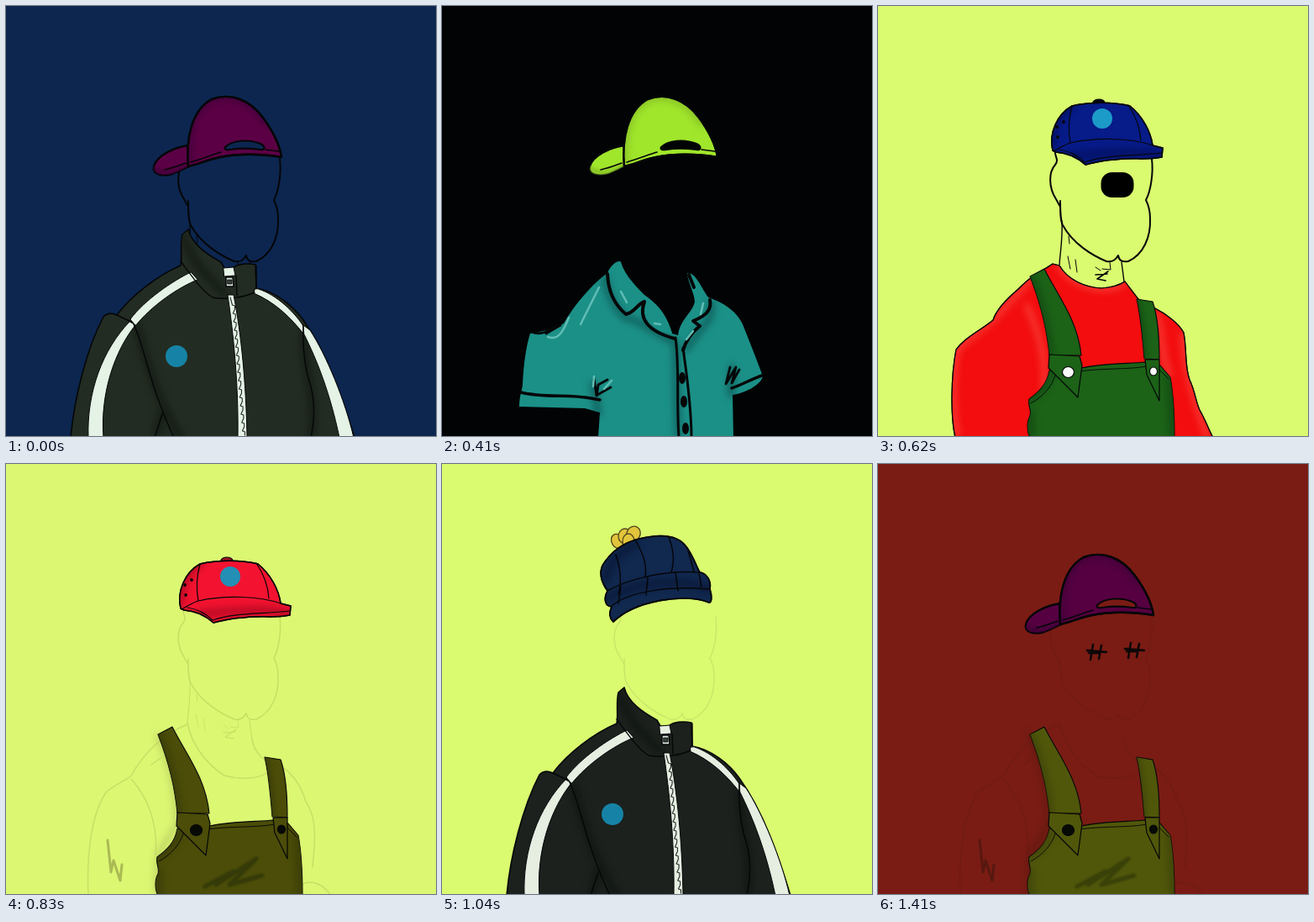
An HTML page with a canvas for the animation above (1.43 s loop, 512x512 px).

```html
<!DOCTYPE html>
<html lang="en">
<head>
<meta charset="utf-8">
<title>Character wardrobe</title>
<style>
html, body { margin: 0; width: 100%; height: 100%; overflow: hidden; background: #0c2650; }
canvas { display: block; width: 100vw; height: 100vh; }
</style>
</head>
<body>
<canvas id="stage" width="512" height="512"></canvas>
<script>
const ctx = document.getElementById('stage').getContext('2d');
const INK = '#050608';
ctx.lineCap = ctx.lineJoin = 'round';

function line(d, color = INK, width = 1.5) {
  ctx.strokeStyle = color;
  ctx.lineWidth = width;
  ctx.stroke(new Path2D(d));
}

function shape(d, fill, color = INK, width = 1.5) {
  ctx.fillStyle = fill;
  ctx.fill(new Path2D(d));
  if (width) line(d, color, width);
}

function oval(x, y, rx, ry, fill, color, width = 1.2, turn = 0) {
  ctx.beginPath();
  ctx.ellipse(x, y, rx, ry, turn, 0, Math.PI * 2);
  ctx.fillStyle = fill;
  ctx.fill();
  if (!color) return;
  ctx.strokeStyle = color;
  ctx.lineWidth = width;
  ctx.stroke();
}

function softLine(d, color, width, blur) {
  ctx.filter = `blur(${blur}px)`;
  line(d, color, width);
  ctx.filter = 'none';
}

// Soft shading along a path, kept inside a garment
function shade(outline, d, color, width = 8, blur = 4) {
  ctx.save();
  ctx.clip(new Path2D(outline));
  softLine(d, color, width, blur);
  ctx.restore();
}

function head(color, width, neck) {
  line('M211 173C210 179 216 183 211 189C203 198 203 216 212 230L217 239M217 232C217 245 217 255 220 261C232 283 255 297 272 304C280 305 283 302 286 297C287 303 290 305 298 304C316 296 325 275 324 253C324 243 322 237 319 231C325 220 328 198 326 182', color, width);
  if (!neck) return;
  line('M219 256C220 278 217 292 216 308M290 305L293 328', color, width * .7);
  line('M227 274L228 283M226 298L229 313M235 302L237 317M276 305L277 314L267 313M259 311L265 315', color, width * .5);
  line('M259 320L273 319M274 316L261 325L271 327', color, width * .8);
}

function hashEyes(color, under) {
  for (const [x, y] of [[260, 224], [305, 222]]) {
    const posts = `M${x - 4} ${y - 9}L${x - 7} ${y + 9}M${x + 6} ${y - 8}L${x + 3} ${y + 8}`;
    const bar = `M${x - 11} ${y - 2}L${x + 12} ${y}M${x - 9} ${y + 1}L${x + 4} ${y + 1}`;
    line(posts + bar, under, 2.8);
    line(posts + bar, color, 1.4);
  }
}

const DOME = 'M217 191C214 158 221 124 245 111C267 103 290 111 306 133C317 148 326 166 328 180C303 176 280 175 255 180C240 183 230 188 217 191Z';
const BRIM = 'M217 166C201 168 179 178 176 191C174 202 188 203 198 200C206 197 212 193 218 191Z';

function backCap(fill, dark, bg) {
  shape(BRIM, fill, INK, 2.4);
  shade(BRIM, 'M177 194C190 202 205 198 218 189', dark, 5, 2);
  shape(DOME, fill, INK, 2.4);
  shade(DOME, 'M218 190C214 155 222 123 246 111C270 103 294 115 310 140', dark, 8);
  line(DOME, INK, 2.4);
  line('M189 195C199 193 206 190 214 187M220 186C236 181 246 177 256 174M309 171L325 173', INK, 1.6);
  shape('M261 168C269 160 288 158 303 164C309 167 309 172 303 171C289 169 278 169 267 171C261 172 260 170 261 168Z', bg, INK, 2.2);
}

const CROWN = 'M208 172C203 152 213 129 231 119C252 114 280 114 300 119C315 131 325 150 327 166L339 169L338 180C318 184 304 180 282 183C266 184 256 187 247 189C238 181 228 175 212 174Z';

function frontCap(fill, dark, mark) {
  oval(263, 115, 7, 4, mark.knob, INK);
  shape(CROWN, fill, INK, 1.5);
  shade(CROWN, 'M208 165C206 146 215 129 231 119M232 178C265 177 300 170 338 178', dark, 9);
  line(CROWN);
  line('M209 173C217 169 222 165 229 163C260 156 301 157 327 166M231 119C227 134 226 148 229 163M298 118C307 131 312 146 313 160M216 171C230 173 239 179 246 186C271 177 305 179 337 175', INK, 1.2);
  for (const [x, y] of [[221, 138], [213, 144], [214, 156]]) oval(x, y, 1.8, 1.9, INK);
  oval(267, 134, 12, 12, mark.color);
}

const RIBBED = 'M210 190C206 183 208 172 214 167C204 163 202 150 206 142C210 126 213 113 222 104C230 93 242 89 254 84C262 80 270 80 278 82C296 90 310 107 316 122C317 138 325 143 326 153C328 165 328 174 327 183C290 182 240 188 210 190Z';

function ribbedHat() {
  shape('M254 74C255 71 259 72 264 74C268 76 266 79 263 82C257 80 258 77 254 74Z', INK);
  shape(RIBBED, '#fb0d33', INK, 1.7);
  shade(RIBBED, 'M206 162C240 155 285 146 325 150M206 145C212 122 224 104 240 92', '#b70a2a', 7, 3);
  line(RIBBED, INK, 1.7);
  line('M214 167C236 160 280 153 326 157', INK, 1.6);
  line('M222 105C219 124 213 143 215 166M234 97C231 117 227 139 228 163M246 91C248 114 242 136 243 160M259 85C261 110 253 133 254 157M273 83C277 108 272 133 272 155M284 87C286 112 283 135 284 155M299 98C307 118 302 136 305 155M312 115C311 132 316 143 316 156', INK, 1.3);
  line('M221 166L218 188M232 163L229 187M248 160L250 185M264 158L266 184M280 157L284 183M296 156L298 182M313 156L316 182', INK, 1.2);
}

const KNIT = 'M191 121C200 106 214 94 235 89C259 83 281 83 292 100C300 112 303 122 307 129C315 130 321 139 319 149C322 158 321 165 318 165C289 153 229 163 204 188C199 183 199 176 202 170C194 169 192 161 197 151C190 141 187 130 191 121Z';

function knitHat() {
  for (const [x, y, r, a] of [[209, 92, 7, -.5], [218, 86, 8, 0], [228, 83, 8, .5], [222, 92, 7, 0]])
    oval(x, y, r, 9, '#e1c43b', '#51451c', 1.3, a);
  shape(KNIT, '#11284f', INK, 1.6);
  shade(KNIT, 'M195 160C230 143 275 133 318 149M195 138C199 119 211 104 231 96', '#0a1939', 8);
  line('M197 151C218 139 260 126 307 129M202 169C222 152 269 145 318 149M207 108C213 126 214 141 210 155M230 90C240 108 244 119 242 135M270 87C276 103 277 115 273 129M293 103L300 128M213 146L210 166M245 135L243 156M278 129L281 151M306 130L309 146', INK, 1.5);
  line(KNIT, INK, 1.6);
}

const JACKET = 'M77 514C81 468 96 408 116 370C122 364 128 366 132 368C149 345 180 321 208 309C210 298 207 285 210 272L217 266C221 284 240 296 256 305L260 312L270 312C275 307 287 306 297 308L298 336C321 340 342 357 354 374C383 414 401 468 415 514Z';

function jacket(fill, dark, stripe) {
  shape(JACKET, fill, INK, 1.6);
  shade(JACKET, 'M211 275C222 305 238 321 260 342M156 382C166 420 179 467 207 512M356 386C352 430 370 460 364 512M185 486L179 512', dark, 9);
  shape('M220 317C199 327 165 350 148 373L154 381C173 357 205 335 228 326Z', stripe, INK, 1);
  shape('M147 376C115 409 96 460 98 514L116 514C112 460 130 410 154 380Z', stripe, INK, 1);
  shape('M297 336C318 341 341 361 354 381L357 394C339 370 319 352 295 342Z', stripe, INK, 1);
  shape('M354 380L362 386C381 415 404 470 414 514L397 514C386 461 370 421 355 391Z', stripe, INK, 1);
  line('M208 304C223 324 234 340 246 347C264 350 283 347 296 341M274 321L275 345M298 309L298 337M132 368L151 377C164 401 170 451 200 514M186 486L177 514M354 380C353 407 356 433 363 453C369 477 367 496 363 514', INK, 1.4);
  shape('M264 344L271 344C280 390 286 450 287 514L276 514C277 450 271 392 264 344Z', stripe, INK, 1);
  let teeth = 'M267 347';
  for (let y = 356; y < 514; y += 10) {
    const x = 269 + (y - 350) * .08;
    teeth += `L${x} ${y}L${x + 3} ${y + 1}L${x + 3} ${y + 5}`;
  }
  line(teeth, '#242a27', 1.1);
  shape('M259 312L271 311L273 321L260 322Z', stripe, INK, 1);
  shape('M262 323L270 323L271 334L262 334Z', '#dbe5dc', INK, 1.5);
  shape('M264 326L269 326L269 331L264 331Z', '#35403a', INK, .8);
  oval(203, 417, 13, 13, '#1683a6');
}

const SWEATER = 'M92 514C86 488 87 440 93 409C103 395 121 387 137 374C141 361 153 349 166 338C172 332 177 327 183 323L208 307L216 309C226 326 246 335 266 336C280 335 288 332 294 328L310 349L330 360C344 367 359 379 364 389C368 410 365 429 371 445C378 460 378 470 383 481C390 493 394 505 399 514Z';

function sweater(fill, dark, width) {
  shape(SWEATER, fill, INK, 1.2);
  shade(SWEATER, 'M94 409L139 372L182 325M94 510C87 470 89 438 94 410M177 357C193 391 201 426 197 455M216 309C231 335 272 345 294 329M331 366C340 390 336 414 347 439M363 390C365 435 379 477 392 512', dark, width);
  line(SWEATER, INK, 1.2);
}

const STRAP_L = 'M181 322L198 313C214 345 238 374 242 416L204 416C201 381 190 345 181 322Z';
const STRAP_R = 'M308 349L327 352C334 372 335 396 335 421L317 420C315 395 313 370 308 349Z';
const BIB = 'M204 434L242 431C270 425 299 426 318 424L336 428L348 442C352 464 353 490 353 514L181 514C177 507 177 495 181 488C183 480 178 476 180 468C191 460 201 451 204 434Z';

function overalls(fill, dark, button, stitch) {
  for (const part of [STRAP_L, STRAP_R, BIB]) shape(part, fill, INK, 1.1);
  shade(STRAP_L, 'M181 322C194 350 202 387 205 416', dark, 8);
  shade(STRAP_R, 'M308 349C313 370 316 393 317 420', dark, 6, 3);
  shade(BIB, 'M180 468C196 458 202 448 206 437M181 512L181 485M347 440L352 512', dark, 8);
  if (stitch) ctx.setLineDash([4, 2]);
  line('M182 473C197 465 207 453 211 440M239 435C269 431 299 433 320 429L335 433L346 444', INK, .9);
  ctx.setLineDash([]);
  shape('M204 415L240 417L243 428L238 466L203 431Z', fill, INK, 1.2);
  shape('M318 421L335 421L335 470L320 439Z', fill, INK, 1.2);
  oval(226.5, 436, 7, 6.5, button, INK, 1.2);
  oval(328, 435, 4.5, 5, button, INK, 1.1);
}

function scribble(color) {
  softLine('M237 503L271 485L250 501L298 470L266 501L305 490', color, 5, 1);
}

function bareBody(color) {
  line('M98 514C96 471 100 420 119 391C130 381 145 376 149 371C164 344 188 321 216 310M173 358L184 350M149 375C170 398 181 430 178 465M216 308C220 330 235 355 260 371C278 376 300 375 310 368M293 328C296 344 306 353 316 355C338 361 351 382 357 402C371 422 368 450 365 480M353 500C366 494 379 502 387 514', color, 1.5);
}

function armMark(color) {
  softLine('M121 448L125 486L128 472L136 496L138 477', color, 3, .7);
}

function strapShadow(color) {
  softLine('M181 323C192 347 202 382 204 429L181 465L180 512', color, 5, 4);
}

const POLO = 'M105 390C119 388 135 383 145 378C158 355 180 330 197 318C200 310 207 304 211 304L293 318C302 318 308 334 317 347C340 355 352 366 358 379C367 402 376 424 382 441C379 452 360 461 346 463L347 514L186 514L188 484L170 479L92 477C92 463 96 456 96 450C97 428 100 405 105 390Z';

function polo(bg) {
  const teal = '#1b9087', light = '#61bdb5';
  shape(POLO, teal, INK, 0);
  shade(POLO, 'M194 324C198 348 209 363 219 372C232 372 240 382 276 400M321 354L319 371L290 409M180 450L186 486M345 430L344 463M278 400L281 512', '#0f5c59', 7);
  shape('M212 300C214 316 228 331 241 344C258 356 268 368 274 390L281 392C284 372 298 366 301 352C300 340 293 330 292 318L292 300Z', bg, bg, 0);
  shape('M242 352C257 359 269 372 274 390C260 389 246 382 242 366Z', teal, INK, 0);
  shape('M284 394C284 379 296 368 303 354L313 359L296 380Z', teal, INK, 0);
  line('M197 319C198 343 208 358 219 367C230 365 232 355 241 352C234 372 244 387 277 396M319 350C321 360 317 368 299 375L307 381C297 389 290 400 287 410M294 320L300 335', INK, 4);
  line('M278 395C283 430 279 470 282 514M287 407C291 438 297 475 297 514', INK, 3);
  for (const [x, y] of [[286, 443], [288, 471], [290, 503]]) oval(x, y, 4, 7, INK);
  line('M94 460C120 467 150 462 177 467L188 469M345 455C357 451 369 444 381 440', INK, 3.5);
  line('M181 444L184 464L186 451L197 445M185 463L201 454M343 430L338 450L350 430L345 449L354 433', INK, 2.8);
  line('M107 388C115 392 125 389 132 382M124 390L141 380', INK, 3);
  line('M187 335L165 379M126 394C139 399 145 386 151 371M213 340L220 353M253 378L260 379M291 397L299 387M311 354L308 367M181 441L180 453M193 456L202 446', light, 2.5);
}

function fill(color) {
  ctx.fillStyle = color;
  ctx.fillRect(0, 0, 512, 512);
}

const NAVY = '#0c2650', BLACK = '#020305', LIME = '#dafa70', RUST = '#7a1c14';

const scenes = [
  [0, () => {
    fill(NAVY);
    head(INK, 2, true);
    jacket('#232c22', '#151d16', '#e4f3e5');
    backCap('#5c0045', '#43003a', NAVY);
  }],
  [200, () => {
    fill(NAVY);
    head(INK, 2, true);
    hashEyes('#cf1c22', '#1c0a14');
    sweater('#fdfee4', '#d3d2b9', 8);
    line('M221 319C237 336 267 345 295 333', INK, 1);
    line('M97 461L122 460L104 474L119 473L108 485M373 452L367 465L376 463L371 477M183 452L179 465M289 411L273 421L285 417', INK, 1.5);
    overalls('#101985', '#0b1164', '#e4d321', true);
    oval(226.5, 436, 2, 2, INK);
    oval(328, 435, 1.5, 1.5, INK);
    oval(277, 494, 27, 27, '#23d453');
    ribbedHat();
  }],
  [410, () => {
    fill(BLACK);
    polo(BLACK);
    backCap('#a0e62b', '#87bf27', BLACK);
  }],
  [620, () => {
    fill(LIME);
    head(INK, 2, true);
    ctx.fillStyle = '#000';
    ctx.beginPath();
    ctx.roundRect(265.5, 198, 39, 30, 13);
    ctx.fill();
    sweater('#f30d0e', '#f7403a', 6);
    overalls('#1c6217', '#124b14', '#fafafa');
    frontCap('#071b89', '#041164', { knob: INK, color: '#1c9bc8' });
  }],
  [830, () => {
    fill('#dcf772');
    head('#c5df62', 1.5, true);
    bareBody('#c8df66');
    armMark('#aaba54');
    strapShadow('#b4c65f');
    overalls('#4b4d08', '#393c08', '#080a05');
    scribble('#343a08');
    frontCap('#f31330', '#b70a24', { knob: '#9d1525', color: '#248fb5' });
  }],
  [1040, () => {
    fill(LIME);
    head('#c9e568', 1.3);
    jacket('#1c211d', '#111713', '#e5eee1');
    knitHat();
  }],
  [1410, () => {
    fill(RUST);
    head('#741b14', 2);
    bareBody('#701b13');
    armMark('#57180f');
    hashEyes(INK, '#2a0d0b');
    strapShadow('#5c180f');
    overalls('#50570a', '#40450a', '#080a05');
    scribble('#394008');
    backCap('#560041', '#410038', RUST);
  }]
];

const LOOP = 1430;
let shown;

function tick() {
  const t = performance.now() % LOOP;
  const scene = scenes.findLast(([start]) => t >= start);
  if (scene !== shown) {
    shown = scene;
    scene[1]();
  }
  requestAnimationFrame(tick);
}
tick();
</script>
</body>
</html>
```
